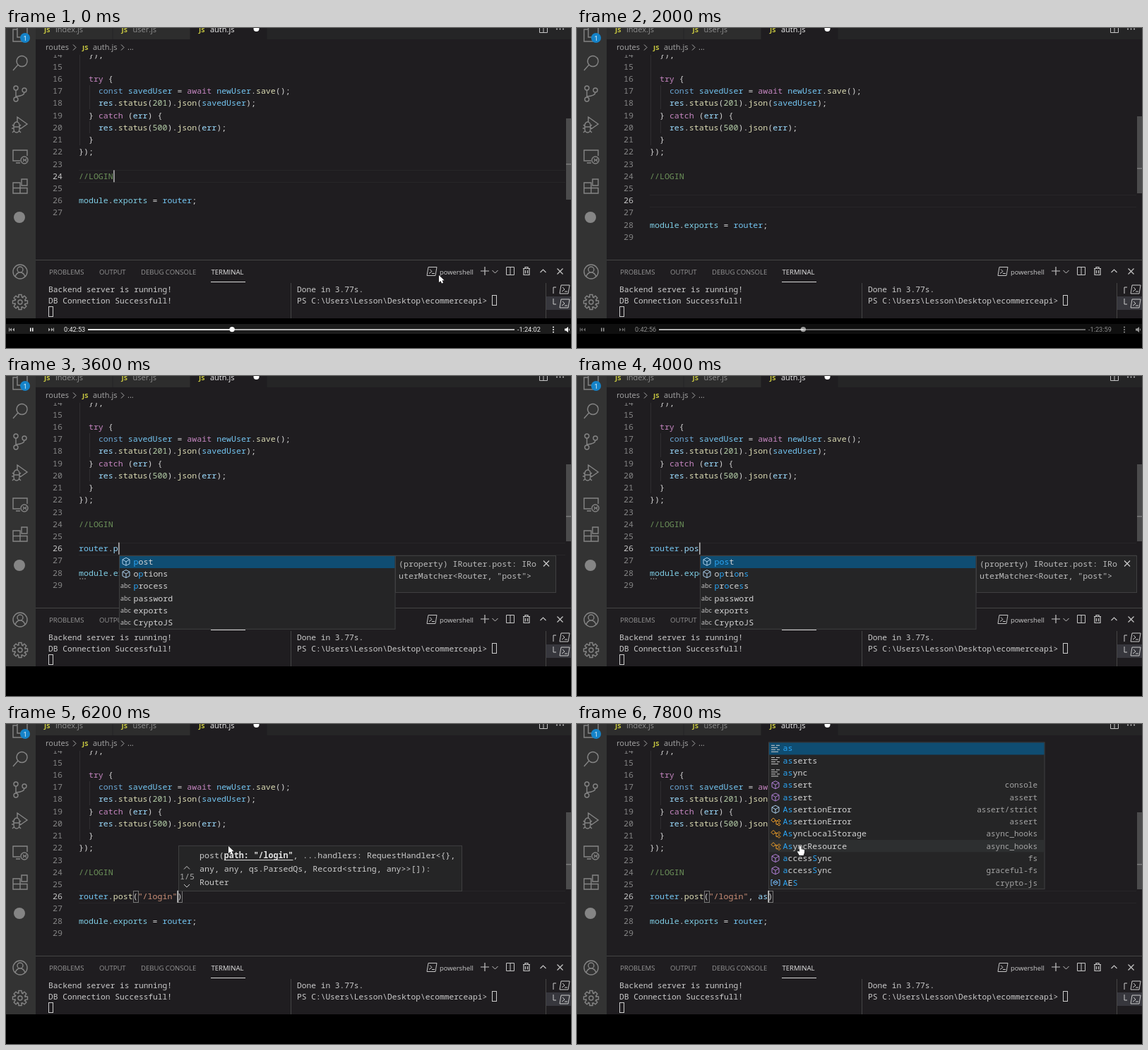
An HTML page with a canvas that plays this animation: 800x453 px, repeating every 8 s.

```html
<!DOCTYPE html>
<html lang="en">
<head>
<meta charset="utf-8">
<title>Code editor lesson</title>
<style>
html, body { margin: 0; width: 100%; height: 100%; overflow: hidden; background: #000; }
canvas { display: block; width: 800px; height: 453px; }
</style>
</head>
<body>
<canvas></canvas>
<script>
const LOOP = 8000, CHAR = 6.97, LINE = 17.22, CODE_X = 103, CARET_LINE = 26;
const BACKGROUND = '#1f1d20';
const MONO = '"Noto Sans Mono", monospace', UI = '"Open Sans", sans-serif';
const CODE_FONT = `500 11.62px ${MONO}`, BOLD_FONT = `bold 11.62px ${MONO}`;
const TERM_FONT = `500 11.22px ${MONO}`, BADGE_FONT = `bold 9.5px ${UI}`;

const canvas = document.querySelector('canvas');
const ctx = canvas.getContext('2d');
const ratio = window.devicePixelRatio || 1;
canvas.width = 800 * ratio;
canvas.height = 453 * ratio;

// Each run: text, time of its first key, ms between keys
const runs = [
  ['router', 2400, 100], ['.post', 3300, 200], ['("/', 4600, 200],
  ['login"', 5400, 110], [', ', 6700, 200], ['as', 7400, 200]
];
const keys = runs.flatMap(([text, start, step]) =>
  [...text].map((char, i) => ({ char, time: start + i * step })));
const ENTERS = [800, 1000];

const code = [
  '  });', '', '  try {', '    const savedUser = await newUser.save();',
  '    res.status(201).json(savedUser);', '  } catch (err) {',
  '    res.status(500).json(err);', '  }', '});', '', '//LOGIN'
];

// Suggestion: icon kind, label, note, whether matches stay unmarked
const routerItems = [
  ['variable', 'router'], ['method', 'Router', 'express'],
  ['variable', 'ReadableStreamDefaultController']
];
const postItems = [
  ['field', 'post'], ['field', 'options'], ['word', 'process'],
  ['word', 'password', '', true], ['word', 'exports', '', true], ['word', 'CryptoJS', '', true]
];
const asItems = [
  ['keyword', 'as'], ['keyword', 'asserts'], ['keyword', 'async'],
  ['method', 'assert', 'console'], ['method', 'assert', 'assert'],
  ['field', 'AssertionError', 'assert/strict'], ['class', 'AssertionError', 'assert'],
  ['class', 'AsyncLocalStorage', 'async_hooks'], ['class', 'AsyncResource', 'async_hooks'],
  ['method', 'accessSync', 'fs'], ['method', 'accessSync', 'graceful-fs'],
  ['variable', 'AES', 'crypto-js']
];

const CUBE = 'M0-5.5L5-3V3L0 5.5L-5 3V-3ZM-5-3L0 0L5-3M0 0V5.5';
const VARIABLE = 'M-4-4H-6V4H-4M4-4H6V4H4M-3-1L0-3L3-1V1L0 3L-3 1ZM-3-1L0 0L3-1';
const kinds = {
  variable: ['#75beff', VARIABLE],
  method: ['#b180d7', CUBE],
  field: ['#a9cdea', CUBE],
  class: ['#ee9d28', 'M-6-2L-3-5L0-2L-3 1ZM-1-1H3M1-1V4H3M3-1L5-3L7-1L5 1ZM3 4L5 2L7 4L5 6Z'],
  keyword: ['#cccccc', 'M-6-4H-1M1-4H6M-6-1H3M-6 2H0M2 2H6M-6 5H4'],
  value: ['#cccccc', 'M-6-4H6V4H-6ZM-3-1H3M-3 1.5H3']
};
const CONSOLE = 'M-5-6H7L5 6H-7ZM-3-3L0 0L-4 3M0 3H4';
const SPLIT = 'M-5.5-5.5H5.5V5.5H-5.5ZM0-5.5V5.5';
const CLOSE = 'M-4-4L4 4M4-4L-4 4';
const UP = 'M-4 2L0-2L4 2', DOWN = 'M-4-2L0 2L4-2', RIGHT = 'M-2-4L2 0L-2 4';
const ARROW = 'M0 0V10L2.5 8L4 11.5L6 10.5L4.5 7.3H7.5Z';
const HAND = 'M0 0Q1-1 2 0V4L7 5V9L5.5 13H0L-3 8Q-2 6 0 8Z';

const activityIcons = [
  [8, 'M-4-12V5H10V-12M-4-6H-10V11H4V5'],
  [49, 'M-3 3A7.5 7.5 0 1 1 3 5.5A7.5 7.5 0 0 1-3 3L-10 11'],
  [93, 'M-6-5V5M6-2Q6 3-6 4M-3-8A3 3 0 1 1-9-8A3 3 0 1 1-3-8M-3 8A3 3 0 1 1-9 8A3 3 0 1 1-3 8M9-5A3 3 0 1 1 3-5A3 3 0 1 1 9-5'],
  [137, 'M-4-3V-11L10-1L0 6M-9 1A4 5 0 0 1-1 1V6A4 5 0 0 1-9 6ZM-9 3H-1M-11 0L-9 2M1 0L-1 2M-12 5H-9M-1 5H2M-11 11L-8 8M1 11L-2 8'],
  [181, 'M0 7H-10V-8H10V0M-6 10H0M11 6A5 5 0 1 1 1 6A5 5 0 1 1 11 6M4 4L6 6L4 8M9 4L7 6L9 8'],
  [224, 'M-10-5H0V10H-10ZM-10 2.5H10V10H0M2-10H10V-1H2Z'],
  [345, 'M10 0A10 10 0 1 1-10 0A10 10 0 1 1 10 0M4-3A4 4 0 1 1-4-3A4 4 0 1 1 4-3M-7 7Q-5 1 0 1Q5 1 7 7']
];

function rect(x, y, w, h, color) {
  ctx.fillStyle = color;
  ctx.fillRect(x, y, w, h);
}
function frame(x, y, w, h, color) {
  ctx.strokeStyle = color;
  ctx.lineWidth = 1;
  ctx.strokeRect(x + .5, y + .5, w - 1, h - 1);
}
function box(x, y, w, h) {
  rect(x, y, w, h, '#252526');
  frame(x, y, w, h, '#3f3f40');
}
function disc(x, y, r, color) {
  ctx.fillStyle = color;
  ctx.beginPath();
  ctx.arc(x, y, r, 0, Math.PI * 2);
  ctx.fill();
}
function text(string, x, y, color, font = CODE_FONT, align = 'left') {
  ctx.font = font;
  ctx.fillStyle = color;
  ctx.textAlign = align;
  ctx.fillText(string, x, y);
}
function path(d, x, y, color, width = 1, filled = false) {
  ctx.save();
  ctx.translate(x, y);
  ctx.strokeStyle = ctx.fillStyle = color;
  ctx.lineWidth = width;
  const shape = new Path2D(d);
  if (filled) ctx.fill(shape); else ctx.stroke(shape);
  ctx.restore();
}
const lineY = n => 72 + (n - 16) * LINE;

function tokenColor(token, rest) {
  if (token.startsWith('//')) return '#6c9159';
  if (token[0] === '"') return '#ce9178';
  if (/^(try|catch|await)$/.test(token)) return '#c586c0';
  if (token === 'const') return '#6aa5d2';
  if (/^\d/.test(token)) return '#b5cea8';
  if (!/^\w/.test(token)) return '#d4d4d4';
  if (rest[0] === '(') return '#dcdcb4';
  if (/^(savedUser|newUser|router)$/.test(token)) return '#74c6f2';
  return /^(module|exports)$/.test(token) ? '#7fcde4' : '#9cdcfe';
}
function drawCode(line, n) {
  for (const { 0: token, index } of line.matchAll(/\/\/.*|"[^"]*"?|\w+|[^\w\s"]/g)) {
    const color = tokenColor(token, line.slice(index + token.length));
    text(token, CODE_X + index * CHAR, lineY(n) + 4, color);
  }
}

function matchedLetters(label, query) {
  const found = new Set();
  let next = 0;
  for (const char of query.toLowerCase()) {
    const lower = label.toLowerCase();
    let at = lower[next] === char ? next : label.indexOf(char.toUpperCase(), next);
    if (at < 0) at = lower.indexOf(char, next);
    if (at < 0) continue;
    found.add(at);
    next = at + 1;
  }
  return found;
}
function drawSuggestions(items, query, x, y, hovered) {
  const width = 391.5, height = items.length * 17.3 + 1;
  box(x, y, width, height);
  items.forEach(([kind, label, note = '', plain], i) => {
    const mid = y + 8.8 + i * 17.3;
    if (i === 0) rect(x + 1, y + 1, width - 2, 17, '#0f4d72');
    if (i === hovered) rect(x + 1, mid - 8.6, width - 2, 17.2, '#2d2f30');
    if (kind === 'word') text('abc', x + 2, mid + 3, '#ccc', `9px ${UI}`);
    else path(kinds[kind][1], x + 10, mid, kinds[kind][0]);
    const marks = matchedLetters(label, plain ? '' : query);
    [...label].forEach((char, c) =>
      text(char, x + 20.5 + c * CHAR, mid + 4, marks.has(c) ? '#2aa5f5' : '#d4d4d4'));
    text(note, x + 381, mid + 4, '#a5a5a5', `11px ${MONO}`, 'right');
  });
}
function drawDetails(lines, x) {
  box(x, 254, 228, 19 + lines.length * 17);
  lines.forEach((line, i) => text(line, x + 5, 270 + i * 17.3, '#bcbcbc'));
  path(CLOSE, x + 214, 265.5, '#ccc', 1.2);
}

function wrap(string, limit) {
  const lines = [];
  let start = 0;
  while (string.length - start > limit) {
    const end = string.lastIndexOf(' ', start + limit);
    lines.push([start, end]);
    start = end + 1;
  }
  return [...lines, [start, string.length]];
}
function drawSignature(x, pathValue, onHandlers) {
  const param = `path: "${pathValue}"`;
  const rest = '...handlers: RequestHandler<{}, any, any, qs.ParsedQs, Record<string, any>>[]';
  const full = `post(${param}, ${rest}): Router`;
  const from = onHandlers ? full.indexOf('...') : 5;
  const to = from + (onHandlers ? rest : param).length;
  const lines = wrap(full, 53);
  const height = lines.length * 18.7 + 9;
  box(x, 237 - height, 402, height);
  path(UP, x + 12, 203.5, '#ccc');
  text('1/5', x + 2, 220, '#a8a8a8');
  path(DOWN, x + 12, 229, '#ccc');
  lines.forEach(([start, end], i) => {
    const y = 227.5 - (lines.length - 1 - i) * 18.7;
    const a = Math.min(Math.max(from, start), end), b = Math.max(a, Math.min(to, end));
    const at = index => x + 30 + (index - start) * CHAR;
    text(full.slice(start, a), at(start), y, '#ccc');
    text(full.slice(a, b), at(a), y, '#e0e0e0', BOLD_FONT);
    if (b > a) rect(at(a), y + 2, (b - a) * CHAR, 1, '#e0e0e0');
    text(full.slice(b, end), at(b), y, '#ccc');
  });
}

function drawActivityBar() {
  rect(0, 0, 42, 411, '#333333');
  for (const [y, d] of activityIcons) path(d, 20, y, '#858585', 1.4);
  disc(27, 14, 7, '#1583c9');
  text('1', 27, 17.5, '#fff', `9px ${UI}`, 'center');
  disc(19, 268, 8, '#858585');
  ctx.save();
  ctx.translate(20, 388);
  for (let i = 0; i < 8; i++) {
    path('M-2.5-7L-2-10.5H2L2.5-7L4.5-6', 0, 0, '#858585', 1.4);
    ctx.rotate(Math.PI / 4);
  }
  ctx.restore();
  path('M3 0A3 3 0 1 1-3 0A3 3 0 1 1 3 0', 20, 388, '#858585', 1.4);
}

function drawTabs() {
  rect(42, 0, 758, 16, '#252526');
  ['index.js', 'user.js', 'auth.js'].forEach((name, i) => {
    const x = 42 + i * 109.5, active = i === 2;
    rect(x, 0, 108.5, 16, active ? BACKGROUND : '#2d2d2d');
    text('JS', x + 12, 5.5, '#cbcb41', BADGE_FONT);
    text(name, x + 28, 6, active ? '#f0f0f0' : '#8f8f8f', `11px ${UI}`);
  });
  disc(354.5, 1, 4, '#fff');
  path(SPLIT, 761, 1, '#c5c5c5');
  [780, 784.5, 789].forEach(x => disc(x, 1.5, 1, '#c5c5c5'));
  rect(42, 16, 758, 22, BACKGROUND);
  const font = `11px ${UI}`;
  text('routes', 56, 31, '#a9a9a9', font);
  path(RIGHT, 97, 27.5, '#a9a9a9');
  text('JS', 108, 30.5, '#cbcb41', BADGE_FONT);
  text('auth.js', 123, 31, '#a9a9a9', font);
  path(RIGHT, 165, 27.5, '#a9a9a9');
  text('...', 172, 31, '#a9a9a9', font);
}

function drawPanel() {
  rect(42, 328, 758, 83, BACKGROUND);
  rect(42, 328, 758, 1, '#444');
  const font = `9.55px ${UI}`;
  [['PROBLEMS', 61], ['OUTPUT', 132], ['DEBUG CONSOLE', 191], ['TERMINAL', 290.5]].forEach(([name, x]) =>
    text(name, x, 349, name === 'TERMINAL' ? '#e7e7e7' : '#969696', font));
  rect(290, 359, 49, 1, '#d8d8d8');
  path(CONSOLE, 603, 344.5, '#c5c5c5');
  text('powershell', 614, 348.5, '#ccc', `9.4px ${UI}`);
  path('M-6 0H6M0-6V6', 678, 344, '#c5c5c5', 1.2);
  path(DOWN, 692.5, 345, '#c5c5c5');
  path(SPLIT, 714, 344, '#c5c5c5');
  path('M-5-3.5H5M-2-3.5V-5.5H2V-3.5M-4-3.5V5.5H4V-3.5M-1.5-1V3.5M1.5-1V3.5', 737, 344, '#c5c5c5', 1.2);
  path(UP, 760.5, 344, '#c5c5c5', 1.2);
  path(CLOSE, 784.5, 344.5, '#c5c5c5', 1.2);

  const print = (line, x, y) => text(line, x, y, '#cccccc', TERM_FONT);
  print('Backend server is running!', 60, 374);
  print('DB Connection Successfull!', 60, 389.6);
  print('Done in 3.77s.', 412, 374);
  print('PS C:\\Users\\Lesson\\Desktop\\ecommerceapi>', 412, 389.6);
  frame(60, 394, 7, 15, '#ccc');
  frame(688, 378, 7, 15, '#ccc');
  rect(403, 361, 1, 50, '#454545');
  rect(764, 361, 1, 50, '#454545');
  rect(765, 380, 35, 19, '#37373d');
  path('M4-4H0V5', 775, 371, '#ccc');
  path('M0-5V3H4', 775, 388, '#ccc');
  path(CONSOLE, 791, 370, '#ccc');
  path(CONSOLE, 791, 390, '#ccc');
}

function clock(seconds) {
  const pad = n => String(n).padStart(2, '0');
  return `${Math.floor(seconds / 3600)}:${pad(Math.floor(seconds / 60) % 60)}:${pad(seconds % 60)}`;
}
function drawPlayer(t) {
  rect(0, 411, 800, 42, '#000');
  ctx.globalAlpha = Math.max(0, Math.min(1, (2400 - t) / 700));
  const total = 7615, now = 2573 + Math.floor(t * .0015);
  const knob = 116 + 604 * now / total, font = '9.2px Roboto, sans-serif';
  rect(0, 419, 800, 14, '#1c1c1c');
  path('M-4-2.5V2.5M0-2.5L-3 0L0 2.5ZM4-2.5L1 0L4 2.5Z', 8, 427, '#aaa', 1, true);
  rect(4, 424.5, 1, 5, '#aaa');
  rect(34, 424.5, 1.5, 5, '#fff');
  rect(37, 424.5, 1.5, 5, '#fff');
  path('M-4-2.5L-1 0L-4 2.5ZM0-2.5L3 0L0 2.5Z', 64, 427, '#aaa', 1, true);
  rect(67, 424.5, 1, 5, '#aaa');
  text(clock(now), 82, 430, '#eee', font);
  rect(116, 426, 604, 2, '#b4b4b4');
  rect(116, 426, knob - 116, 2, '#e8e8e8');
  disc(knob, 426.6, 3.7, '#fff');
  text('-' + clock(total - now), 724, 430, '#eee', font);
  [423.5, 427, 430.5].forEach(y => disc(775, y, 1, '#fff'));
  path('M-4-1.5H-2L1-4V4L-2 1.5H-4ZM2-2Q4 0 2 2Z', 795, 427, '#fff', 1, true);
  ctx.globalAlpha = 1;
}

function drawPointer(t) {
  if (t < ENTERS[0]) path(ARROW, 613, 350, '#fff', 1, true);
  else if (t >= 6000) path(t < 7400 ? ARROW : HAND, 315, 173, '#fff', 1, true);
}

function typedAt(t) {
  return keys.filter(key => key.time <= t).map(key => key.char).join('');
}

function drawEditor(t, typed) {
  const extra = ENTERS.filter(time => t >= time).length;
  const current = 24 + extra, last = 27 + extra;
  for (const y of [-8.6, 8.6]) rect(CODE_X, Math.round(lineY(current) + y), 689, 1, '#272628');
  rect(104, 38, 1, 128, '#2f2e30');
  rect(118, 81, 1, 34, '#2f2e30');
  rect(118, 132, 1, 17, '#2f2e30');
  for (let n = 14; n <= last; n++)
    text(n, 80, lineY(n) + 4, n === current ? '#c6c6c6' : '#858585', CODE_FONT, 'right');
  code.forEach((line, i) => drawCode(line, 14 + i));
  drawCode('module.exports = router;', last - 1);

  const openQuote = typed.split('"').length % 2 === 0;
  const open = typed.indexOf('(');
  const line = typed + (openQuote ? '"' : '') + (open >= 0 ? ')' : '');
  drawCode(line, CARET_LINE);
  if (open >= 0) for (const col of [open, line.length - 1])
    frame(Math.round(CODE_X + col * CHAR), 236, 8, 17, '#777');
  if (typed.includes('.') && open < 0)
    [105, 108.5, 112].forEach(x => disc(x, 287, .8, '#aaa'));

  const column = extra ? typed.length : '//LOGIN'.length;
  const caretX = CODE_X + column * CHAR + .5;
  const lastKey = Math.max(0, ...ENTERS.filter(e => e <= t), ...keys.map(k => k.time).filter(k => k <= t));
  if (Math.floor((t - lastKey) / 330) % 2 === 0)
    rect(caretX, lineY(current) - 8.5, 1.3, 17, '#d0d0d0');

  const top = extra ? 125 : 128;
  rect(793, top, 7, extra ? 109 : 115, '#4b4b4c');
  rect(793, extra ? 198 : 192, 7, 1.5, '#7a7a7a');
  return Math.round(caretX + .7);
}

function drawPopups(t, typed, x) {
  const open = typed.includes('('), tail = typed.match(/\w*$/)[0];
  if (!typed) return;
  if (!typed.includes('.')) {
    drawSuggestions(routerItems, tail, x, 254);
    drawDetails(['const router: Router'], x + 391);
  } else if (!open) {
    drawSuggestions(postItems, tail, x, 254);
    drawDetails(['(property) IRouter.post: IRo', 'uterMatcher<Router, "post">'], x + 391);
  } else if (/, a/.test(typed)) {
    drawSuggestions(asItems, tail, x, 25.5, 8);
  } else {
    const value = (typedAt(t - 250).match(/"([^"]*)/) || ['', ''])[1];
    drawSignature(x, value, typed.includes(','));
    if (typed.endsWith('"/')) drawSuggestions([['value', '/']], '/', x, 254);
  }
}

function draw(now) {
  const t = now % LOOP, typed = typedAt(t);
  ctx.setTransform(ratio, 0, 0, ratio, 0, 0);
  rect(0, 0, 800, 453, BACKGROUND);
  const popupX = drawEditor(t, typed);
  drawTabs();
  drawActivityBar();
  drawPanel();
  drawPopups(t, typed, popupX);
  drawPlayer(t);
  drawPointer(t);
}

const begin = performance.now();
function tick() {
  draw(performance.now() - begin);
  requestAnimationFrame(tick);
}
tick();
</script>
</body>
</html>
```
